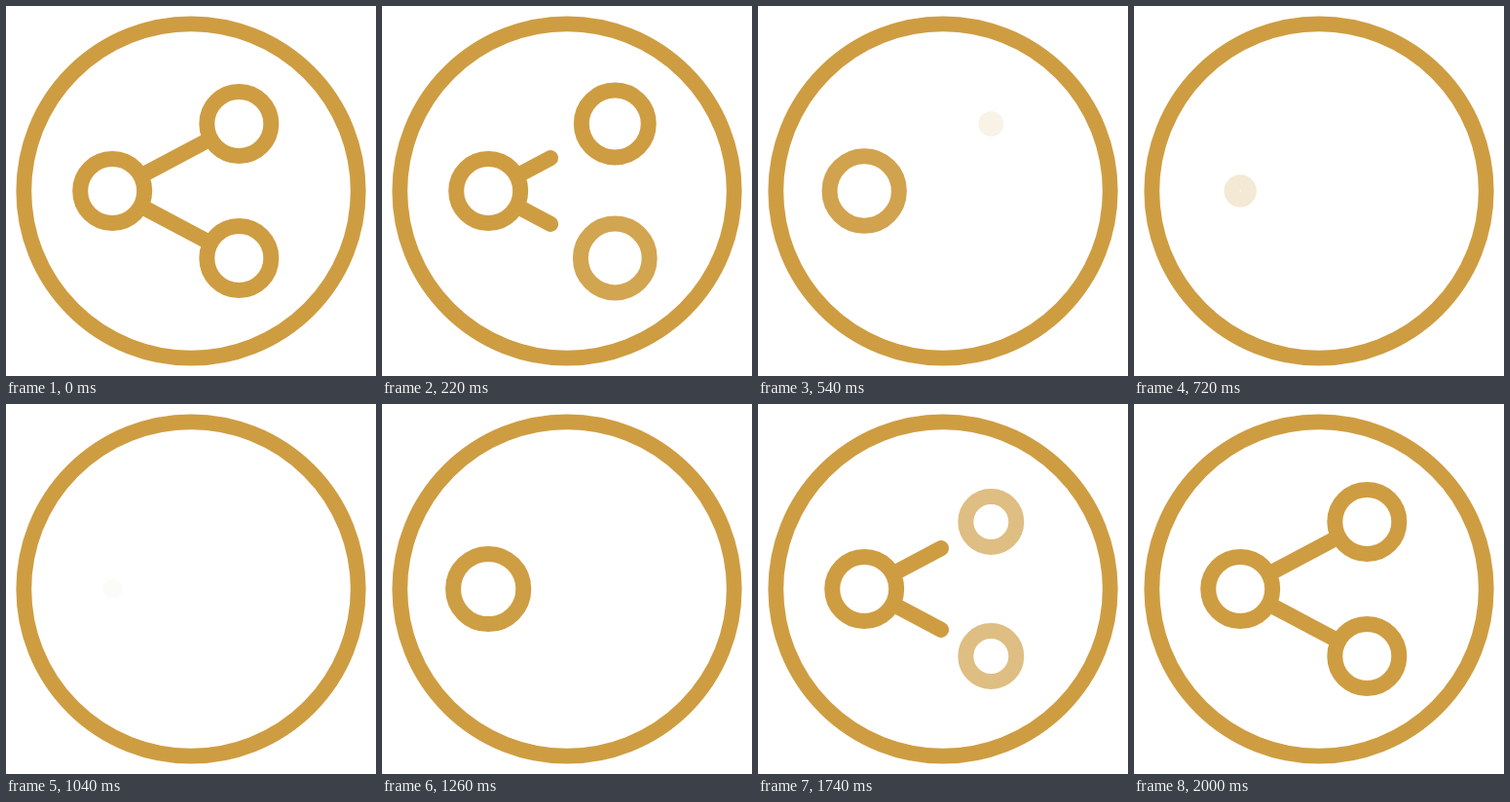
Recreate the animation shown at these times as an HTML page with a canvas. Size 380 by 380 pixels, loop 2.5 s.

```html
<!DOCTYPE html>
<html lang="en">
<head>
<meta charset="utf-8">
<title>Share icon</title>
<style>
html, body { margin: 0; width: 100%; height: 100%; overflow: hidden; background: #fff; }
canvas { display: block; width: 380px; height: 380px; }
</style>
</head>
<body>
<canvas id="stage" width="380" height="380"></canvas>
<script>
const ctx = document.getElementById('stage').getContext('2d');
const LOOP = 2500, STEP = 20;
const RADIUS = 33, STROKE = 16;

// leave / enter: [start, duration] in ms
const hub = { x: 109.2, y: 190, leave: [318, 428], enter: [1036, 350] };
const top_ = { x: 239.3, y: 121, leave: [140, 414], enter: [1660, 340] };
const bottom = { x: 239.3, y: 259, leave: [0, 410], enter: [1660, 340] };
const link = { leave: [0, 416], enter: [1500, 350] };

const progress = (t, [start, span]) => Math.min(1, Math.max(0, (t - start) / span));
const backIn = p => 2.70158 * p ** 3 - 1.70158 * p ** 2;

// 0 = fully shown, 1 = gone
function hidden(part, t) {
  return t < part.enter[0] ? progress(t, part.leave) : 1 - progress(t, part.enter);
}

function ring(x, y, r, width) {
  ctx.lineWidth = width;
  ctx.beginPath();
  ctx.arc(x, y, Math.max(0, r), 0, Math.PI * 2);
  ctx.stroke();
}

function node(part, t) {
  const h = hidden(part, t);
  if (h >= 1) return;
  const r = RADIUS * (1 - backIn(h));
  ctx.globalAlpha = 1 - h ** 4;
  if (r < STROKE / 2) {
    // the stroke has closed over the hole
    ctx.beginPath();
    ctx.arc(part.x, part.y, r + STROKE / 2, 0, Math.PI * 2);
    ctx.fill();
  } else {
    ring(part.x, part.y, r, STROKE);
  }
  ctx.globalAlpha = 1;
}

function spoke(end, t) {
  const shown = 1 - hidden(link, t);
  if (shown <= 0) return;
  const dx = end.x - hub.x, dy = end.y - hub.y;
  const dist = Math.hypot(dx, dy);
  const from = 35 / dist;
  const to = from + (1 - RADIUS / dist - from) * shown;
  ctx.lineWidth = STROKE;
  ctx.beginPath();
  ctx.moveTo(hub.x + dx * from, hub.y + dy * from);
  ctx.lineTo(hub.x + dx * to, hub.y + dy * to);
  ctx.stroke();
}

function draw(now) {
  const t = Math.floor((now % LOOP) / STEP) * STEP;
  ctx.fillStyle = '#fff';
  ctx.fillRect(0, 0, 380, 380);
  ctx.strokeStyle = ctx.fillStyle = '#ce9d42';
  ctx.lineCap = 'round';
  ring(190, 190, 171.7, 15.8);
  spoke(top_, t);
  spoke(bottom, t);
  [hub, top_, bottom].forEach(part => node(part, t));
}

const begin = performance.now();
function tick() {
  draw(performance.now() - begin);
  requestAnimationFrame(tick);
}
tick();
</script>
</body>
</html>
```
